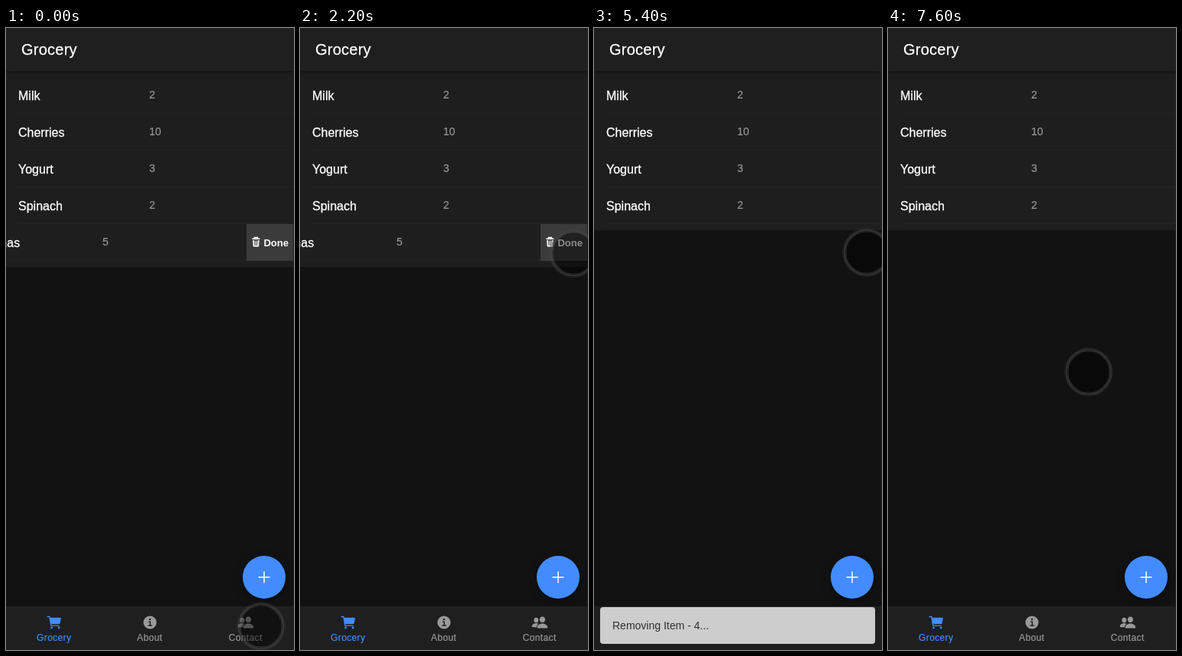
An HTML page with a canvas for the animation above (8000 ms loop, 376 px wide and 812 px high).

```html
<!DOCTYPE html>
<html lang="en">
<head>
<meta charset="utf-8">
<title>Grocery</title>
<style>
  html, body { margin: 0; width: 100%; height: 100%; overflow: hidden; background: #121212; }
  #stage { position: relative; width: 100%; height: 100%; overflow: hidden; contain: strict; }
  svg { position: absolute; left: 0; top: 0; display: block; }
  text {
    font-family: "Liberation Sans", Arial, sans-serif; white-space: pre;
    color: #fff; fill: currentColor; stroke: currentColor; stroke-width: .3px;
  }
  .title { font-size: 20px; letter-spacing: .0125em; }
  .name { font-size: 16px; }
  .qty { font-size: 14px; color: #999; stroke-width: .15px; }
  .done { font-size: 13px; font-weight: bold; stroke: none; }
  .tab { color: #999; fill: currentColor; }
  .tab text { font-size: 12px; letter-spacing: .03em; text-anchor: middle; color: inherit; stroke-width: .2px; }
  .tab.on { color: #428cff; }
  .note { font-size: 14px; color: #303030; stroke: none; }
  .line { stroke: #232323; }
  .bar { filter: drop-shadow(0 2px 1.5px #0003) drop-shadow(0 2px 3px #0003); }
  .fab { filter: drop-shadow(0 2px 2px #0003) drop-shadow(0 3px 6px #0004); }
  #cursor { position: absolute; left: 0; top: 0; width: 64px; height: 64px; image-rendering: pixelated; }
</style>
</head>
<body>
<div id="stage">
<svg width="376" height="812" viewBox="0 0 376 812">
  <clipPath id="button"><path d="M314 256h61v48h-61z"/></clipPath>
  <rect width="376" height="812" fill="#121212"/>
  <rect id="list" y="56" width="375" fill="#1e1e1e"/>
  <g id="rows"></g>

  <g id="swiped">
    <path class="line" d="M0 303.5H314"/>
    <text class="name" x="-45" y="286">Bananas</text>
    <text class="qty" x="126" y="284">5</text>
    <g clip-path="url(#button)">
      <rect x="314" y="256" width="61" height="48" fill="#3b3b3b"/>
      <circle id="ripple" cx="349" cy="284.5" fill="#fff" opacity=".09"/>
    </g>
    <g fill="none" stroke="#fff">
      <path d="M321.4 275.3h10M324.4 275v-1.4h4v1.4" stroke-width="1.5"/>
      <path d="M323 277l.5 7.6h5.8l.5-7.6" stroke-width="1.7" stroke-linejoin="round"/>
      <path d="M325.4 277.5v6M327.4 277.5v6"/>
    </g>
    <text class="done" x="336.4" y="285">Done</text>
  </g>

  <rect class="bar" width="375" height="56" fill="#1f1f1f"/>
  <text class="title" x="20" y="35">Grocery</text>

  <circle class="fab" cx="337" cy="717" r="28" fill="#428cff"/>
  <path d="M330 717h14M337 710v14" stroke="#fff" stroke-width="1.5" stroke-linecap="round"/>

  <rect y="755" width="375" height="57" fill="#1f1f1f"/>
  <path class="line" d="M0 755.5H375"/>
  <g class="tab on">
    <g transform="translate(52 765) scale(.043)" stroke="currentColor" stroke-width="32" stroke-linecap="round" stroke-linejoin="round">
      <circle cx="176" cy="416" r="16"/>
      <circle cx="400" cy="416" r="16"/>
      <path d="M48 80h64l48 272h240" fill="none"/>
      <path d="M134 128h312l-32 160H162z"/>
    </g>
    <text x="62.7" y="800">Grocery</text>
  </g>
  <g class="tab">
    <circle cx="188" cy="776" r="8.6"/>
    <circle cx="188" cy="772.1" r="1.25" fill="#1f1f1f"/>
    <path d="M186.7 775.2h1.6v4.7M186 780h4.3" fill="none" stroke="#1f1f1f" stroke-width="1.4" stroke-linecap="round"/>
    <text x="187.7" y="800">About</text>
  </g>
  <g class="tab">
    <g transform="translate(302 765) scale(.043)">
      <ellipse cx="336" cy="168" rx="82" ry="88"/>
      <path d="M204 432a28 30 0 0 1-27-36c34-144 284-144 318 0a28 30 0 0 1-27 36z"/>
      <ellipse cx="147" cy="186" rx="69" ry="74"/>
      <path d="M42 400a25 27 0 0 1-25-33c20-86 134-106 204-71-34 22-54 57-62 104z"/>
    </g>
    <text x="312.7" y="800">Contact</text>
  </g>

  <g id="toast">
    <rect x="8" y="756" width="359" height="48" rx="4" fill="#cdcdcd"/>
    <text class="note" x="24" y="785">Removing Item - 4...</text>
  </g>
  <rect x="375" width="1" height="812" fill="#24211f"/>
</svg>
<canvas id="cursor" width="32" height="32"></canvas>
</div>

<script>
const LOOP = 8000, STEP = 200, REMOVED = 4000;
const $ = id => document.getElementById(id);

const items = { Milk: 2, Cherries: 10, Yogurt: 3, Spinach: 2 };
$("rows").innerHTML = Object.entries(items).map(([name, qty], i) => {
  const y = 64 + i * 48;
  return `<path class="line" d="M16 ${y + 47.5}H375"/>
    <text class="name" x="16" y="${y + 30}">${name}</text>
    <text class="qty" x="187" y="${y + 28}">${qty}</text>`;
}).join("");

// Touch pointer: coarse ring around a translucent disc
const pen = $("cursor").getContext("2d");
const disc = r => { pen.beginPath(); pen.arc(16, 16, r, 0, Math.PI * 2); };
disc(13.6);
pen.fillStyle = "rgba(0,0,0,.45)";
pen.fill();
disc(14.5);
pen.lineWidth = 2;
pen.strokeStyle = "rgba(70,70,70,.55)";
pen.stroke();

// Pointer stops: time, x, y
const stops = [
  [0, 333, 781], [400, 366, 701], [1000, 310, 541], [1200, 317, 530],
  [1600, 375, 279], [2200, 357, 294], [5400, 356, 293], [6200, 262, 449]
];

function pointer(t) {
  const i = stops.findIndex(s => s[0] > t);
  if (i < 0) return stops.at(-1).slice(1);
  const [a, b] = [stops[i - 1], stops[i]];
  const p = (t - a[0]) / (b[0] - a[0]);
  const e = p * p * (3 - 2 * p);
  return [1, 2].map(k => Math.round(a[k] + (b[k] - a[k]) * e));
}

function toastOpacity(t) {
  if (t < REMOVED) return 0;
  return Math.max(0, Math.min(1, .9 + (t - REMOVED) / 2000, (7404 - t) / STEP));
}

function draw() {
  // The screen refreshes five times a second
  const t = Math.floor(performance.now() % LOOP / STEP) * STEP;
  const [x, y] = pointer(t);
  const removed = t >= REMOVED;
  $("cursor").style.transform = `translate(${x - 32}px, ${y - 32}px)`;
  $("ripple").setAttribute("r", t < 3400 ? 0 : 7 + (t - 3400) / 5);
  $("swiped").style.display = removed ? "none" : "";
  $("list").setAttribute("height", removed ? 208 : 256);
  $("toast").setAttribute("opacity", toastOpacity(t));
  requestAnimationFrame(draw);
}
draw();
</script>
</body>
</html>
```
